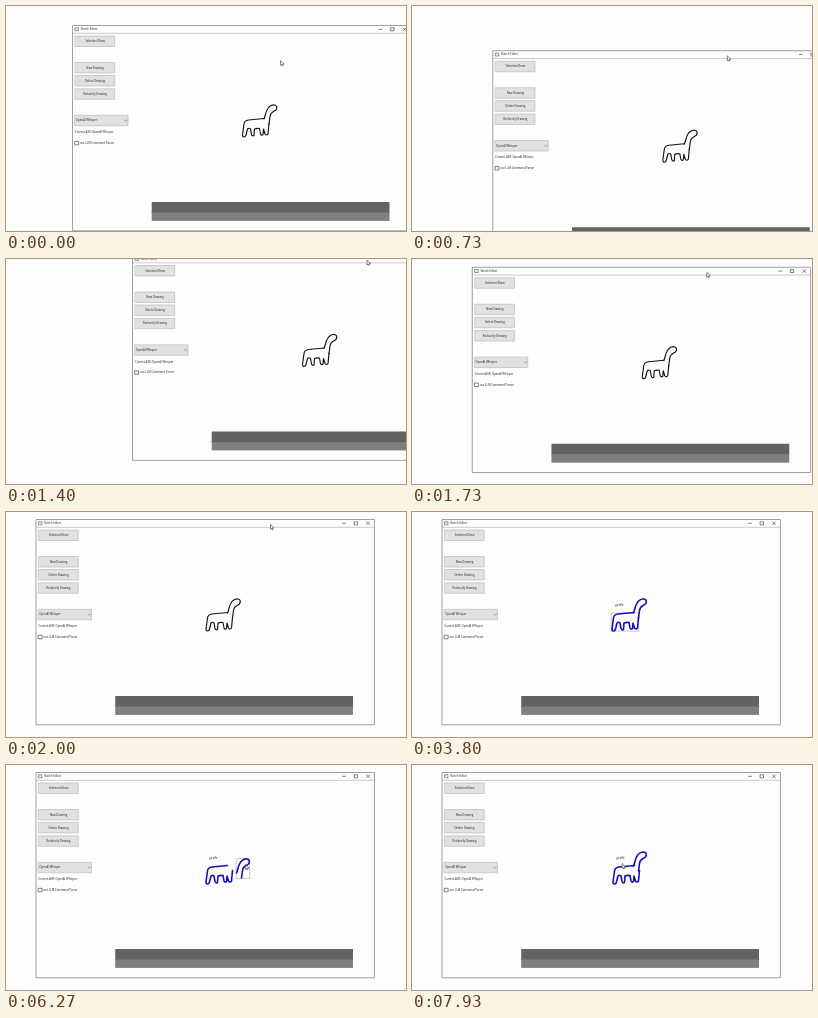
An HTML page with a canvas for the animation above (8 s loop, 400x225 px).

```html
<!DOCTYPE html>
<html lang="en">
<head>
<meta charset="utf-8">
<title>Sketch editor</title>
<style>
html, body { margin: 0; width: 100%; height: 100%; overflow: hidden; background: #fdfdfd; }
canvas { display: block; width: 400px; height: 225px; }
</style>
</head>
<body>
<canvas id="stage"></canvas>
<script>
const LOOP = 8000, STEP = 200 / 3;
const canvas = document.getElementById('stage');
const c = canvas.getContext('2d');
const ratio = window.devicePixelRatio || 1;
canvas.width = 400 * ratio;
canvas.height = 225 * ratio;

// Keys are [time, x, y].
const windowPath = [[600, 36.5, 12], [730, 50, 36], [870, 84, 88], [1000, 108, 113], [1130, 110, 88],
  [1270, 102, 22], [1400, 96.5, -11.5], [1467, 85, -3], [1670, 40, 1], [1930, 0, 0]];
const pointerPath = [[200, 238, 43], [533, 264.5, 13], [2000, 264.5, 13], [2200, 218, 104]];
const headPath = [[5330, 0, 0], [5800, 13, 3], [6267, 9, 7], [6500, 13, 1], [6800, 5, -2], [7067, 0, 0]];
const bodyPath = [[7200, 0, 0], [7530, -7, -4], [7930, 1, 0]];

const body = new Path2D('M221.5 100.5 L206 102 Q202 102.5 201.5 106 L200 117 Q200 119 201.5 119 Q203 119 203.5 117' +
  ' L205 111 Q206.5 109.5 208 111 L209 116.5 Q210 118.5 211.5 117.5 L212 111 Q214.5 110 217 110.5' +
  ' L218 116 Q219 118 220.5 116.5 L221 111 L222.5 116 Q224 118 225.5 116 L226.5 105.5');
const head = new Path2D('M221.5 101 C223 98 223 93 226 89.5 Q229 86.5 232 87 Q234.5 87.5 234.3 90' +
  ' Q234 92.5 231 93.5 Q228 95 227.5 98.5 L226.5 106');
const arrow = new Path2D('M0 0 L0 4.4 L1 3.5 L1.8 5 L2.6 4.6 L1.9 3.2 L3.2 3.1 Z');

function along(keys, t) {
  if (t <= keys[0][0]) return keys[0].slice(1);
  for (let i = 1; i < keys.length; i++) {
    const [t0, x0, y0] = keys[i - 1], [t1, x1, y1] = keys[i];
    if (t < t1) {
      const k = (t - t0) / (t1 - t0);
      return [x0 + (x1 - x0) * k, y0 + (y1 - y0) * k];
    }
  }
  return keys[keys.length - 1].slice(1);
}

function rect(x, y, w, h, fill, stroke, line = 0.6) {
  if (fill) { c.fillStyle = fill; c.fillRect(x, y, w, h); }
  if (stroke) { c.strokeStyle = stroke; c.lineWidth = line; c.strokeRect(x, y, w, h); }
}

function text(s, x, y, align = 'left', size = 2.8) {
  c.font = size + 'px "Open Sans", sans-serif';
  c.textAlign = align;
  c.textBaseline = 'middle';
  c.fillStyle = '#222';
  c.fillText(s, x, y);
}

function line(d, color, width) {
  c.strokeStyle = color;
  c.lineWidth = width;
  c.stroke(new Path2D(d));
}

function button(label, y) {
  rect(32.8, y, 39.4, 10.5, '#e1e1e1', '#b4b4b4');
  text(label, 52.5, y + 5.4, 'center');
}

function drawWindow() {
  rect(30.4, 7.5, 338, 205.3, '#fdfdfd', '#888', 0.8);
  line('M30.5 15.3 H368', '#aaa', 0.6);
  rect(32.8, 9.8, 3.2, 3, '#eee', '#555', 0.6);
  text('Sketch Editor', 38, 11.4);
  line('M336.5 11.3 h3 M348.5 9.8 h3 v3 h-3 z M360.5 9.8 l3 3 m0 -3 l-3 3', '#333', 0.6);
  button('Selection/Draw', 18);
  button('New Drawing', 44.5);
  button('Delete Drawing', 57.5);
  button('Reclassify Drawing', 70.8);
  rect(32.3, 97.3, 53.2, 10.5, '#e1e1e1', '#b4b4b4');
  text('OpenAI Whisper', 33.3, 102.7);
  line('M82 102 l1.2 1.2 l1.2 -1.2', '#555', 0.5);
  text('Current ASR: OpenAI Whisper', 32.4, 114.5);
  rect(32.6, 123.3, 3.5, 3.5, '#fff', '#333', 0.6);
  text('use LLM Command Parser', 37.4, 125.2);
  rect(109.2, 184, 237.8, 10.6, '#636363');
  rect(109.2, 194.6, 237.8, 8.3, '#7f7f7f');
  line('M109.2 194.5 H347', '#505050', 0.5);
}

function part(path, [x, y], color, width, box) {
  c.save();
  c.translate(x, y);
  if (box) rect(...box, null, '#999', 0.5);
  c.strokeStyle = color;
  c.lineWidth = width;
  c.stroke(path);
  c.restore();
}

function drawAnimal(t, headAt, bodyAt) {
  const named = t >= 2400;
  const color = named ? '#170fb8' : '#111', width = named ? 1.6 : 1.15;
  const bodyBox = (t >= 3660 && t < 5330) || (t >= 7130 && t < 7900);
  const headBox = t >= 5330 && t < 7130;
  part(body, bodyAt, color, width, bodyBox && [199.7, 101, 27, 18.2]);
  part(head, headAt, color, width, headBox && [221.6, 86.5, 13, 20]);
  if (named) text('giraffe', 203.3 + bodyAt[0], 93.6 + bodyAt[1]);
}

function drawPointer(t, headAt, bodyAt) {
  let at;
  if (t < 2390) at = along(pointerPath, t);
  else if (t >= 7130) at = [209 + bodyAt[0], 99 + bodyAt[1]];
  else if (t >= 5330) at = [230.5 + headAt[0], 93 + headAt[1]];
  else return;
  c.save();
  c.translate(...at);
  c.fillStyle = '#fff';
  c.fill(arrow);
  c.strokeStyle = '#333';
  c.lineWidth = 0.6;
  c.stroke(arrow);
  c.restore();
}

function draw(now) {
  const t = Math.floor((now % LOOP) / STEP + 0.06) * STEP;
  const headAt = along(headPath, t), bodyAt = along(bodyPath, t);
  c.setTransform(ratio, 0, 0, ratio, 0, 0);
  c.lineCap = c.lineJoin = 'round';
  rect(0, 0, 400, 225, '#fdfdfd');
  rect(197, 88, 50, 50, '#858585');
  c.translate(...along(windowPath, t));
  drawWindow();
  drawAnimal(t, headAt, bodyAt);
  drawPointer(t, headAt, bodyAt);
}

const start = performance.now();
function tick() {
  draw(performance.now() - start);
  requestAnimationFrame(tick);
}
tick();
</script>
</body>
</html>
```
